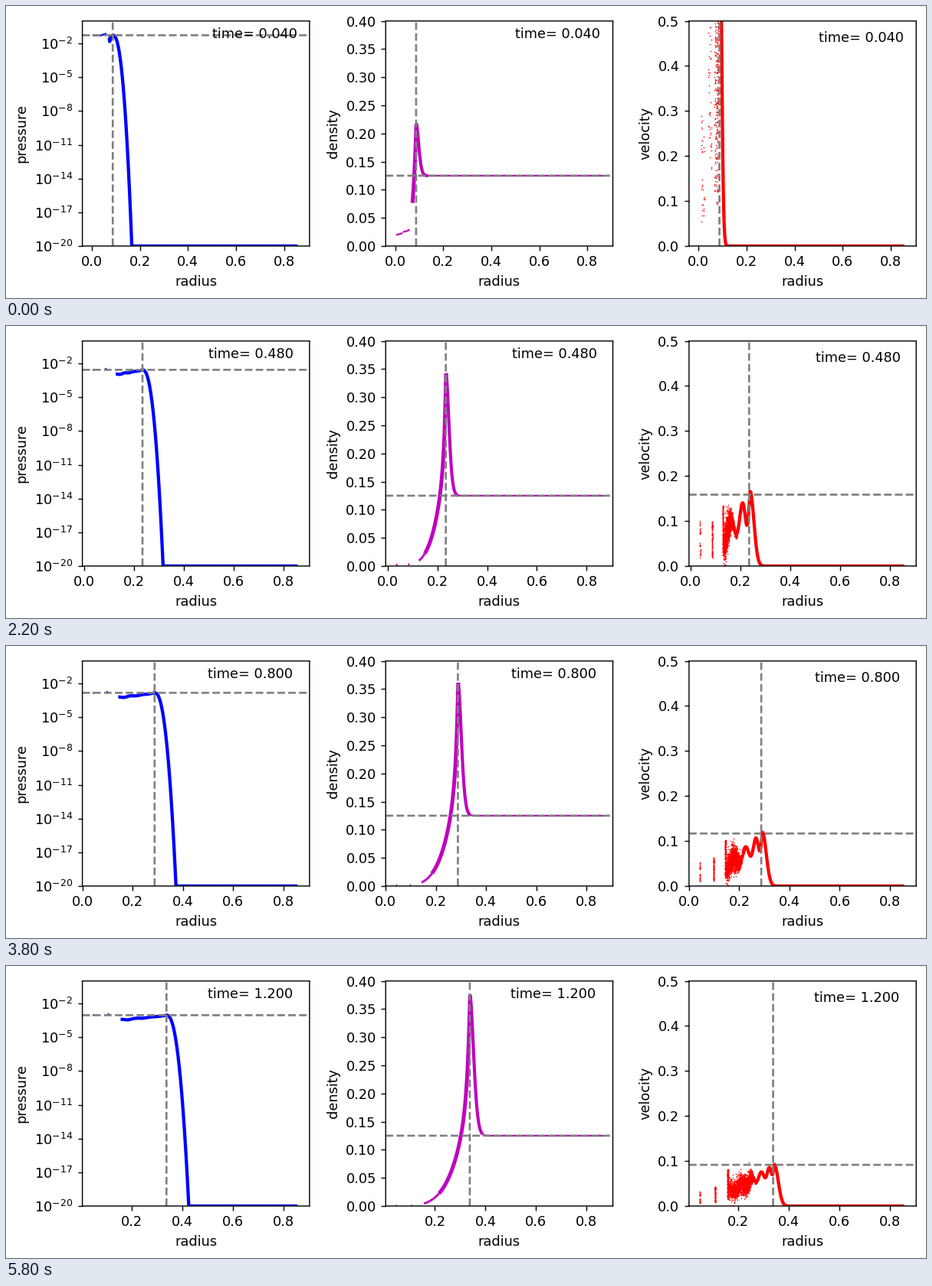
Write a matplotlib script that moves like this. It is 1200 px wide and 382 px high and loops after 6 s.

```python
import numpy as np
import matplotlib.pyplot as plt
from matplotlib.animation import FuncAnimation

W, H, DPI = 1200, 382, 128
FRAMES, STEP_MS = 30, 200
DT = 0.04
R_MAX, R_DATA = 0.8635, 0.857
RHO0 = 0.125

plt.rcParams["font.family"] = "DejaVu Sans"
plt.rcParams["path.snap"] = False

rng = np.random.default_rng(7)
CLOUD_U = rng.uniform(0, 1, 2400)
CLOUD_N = rng.normal(0, 1, 2400)
SHELL_U = [rng.uniform(-1, 1, (2, n)) for n in (32, 95, 160)]


class Blast:
    """Strong explosion at time t: the front and the zones behind it."""

    def __init__(self, t):
        self.t = t
        self.R = 0.3142 * t**0.4
        self.logp = -2.945 - 1.2 * np.log10(t)
        self.V = 0.1021 * t**-0.6
        self.r_min = 0.0436 + 0.0126 * np.log(t)
        self.inner = 0.15 * t**0.23
        self.peak = 0.537 - 0.168 * t**-0.2

        # Speed ripples: crest spacing, depth, and crests before the noise
        self.Rv = self.R + 0.005 * (1 - np.exp(-t / 0.3))
        self.top = self.V * (1 + 0.12 * np.exp(-t / 0.5))
        self.wave = 0.0388 - 0.0152 * t
        self.depth = 0.63 * np.exp(-0.85 * t)
        self.calm = max(0.1, 2.45 + 1.15 * np.log(t))

        # Isolated inner shells: radius, mean speed
        self.width = 0.002 * t**-0.6
        self.shells = (
            (self.r_min + self.width, min(0.17, 0.0235 * t**-1.25)),
            (0.103 * t**0.25, 0.03 * t**-0.9),
            (self.inner + 0.002, 0.053 * t**-0.55),
        )

    def pressure(self):
        q = np.linspace(0, 1, 100)
        wiggle = 0.05 + 0.4 * np.exp(-self.t / 0.05)
        dip = (1 - q) * wiggle * np.cos(6 * np.pi * q) - 0.42 * (1 - q) ** 0.8
        u = np.linspace(0, 1, 120)
        front = self.R + u * (0.079 + 0.0078 * self.t)
        r = np.r_[self.inner + q * (self.R - self.inner), front, R_DATA]
        y = np.r_[self.logp + dip, self.logp - (self.logp + 20) * u**2.35, -20]
        return r, 10.0**y

    def density(self, r):
        R = self.R + 0.001
        lam = np.minimum(r / R, 1)
        base = RHO0 / 0.9**5
        behind = base * lam**5 + (self.peak - base) * np.exp((lam - 1) / 0.03)
        scale = 0.0145 + 0.005 * self.t
        fall = np.exp(-(np.maximum(r - R, 0) / scale) ** 1.7)
        return np.where(r < R, behind, RHO0 + (self.peak - RHO0) * fall)

    def speed(self, r):
        n = (np.maximum(self.Rv - r, 0) / self.wave) ** (1 / 1.35)
        ripple = 1 - self.depth * (1 - np.cos(2 * np.pi * n)) / 2
        scale = 0.0215 - 0.014 * np.exp(-self.t / 0.12)
        fall = np.exp(-(np.maximum(r - self.Rv, 0) / scale) ** 2)
        return self.top * np.minimum(r / self.Rv, 1) ** 1.2 * ripple * fall, n


def make_axes(i, ylabel, ticks, ylim, scale="linear"):
    ax = fig.add_axes([(99.6 + 395.65 * i) / W, 68 / H, 296.3 / W, 294.4 / H])
    ax.set_yscale(scale)
    ax.set_xlabel("radius")
    ax.set_ylabel(ylabel)
    ax.set_xticks(np.arange(0, 0.9, 0.2))
    ax.set_yticks(ticks)
    ax.set_yticks([], minor=True)
    ax.set_ylim(*ylim)
    return ax


def curve(ax, color, width):
    return ax.plot([], [], color=color, lw=width, solid_capstyle="butt")[0]


def guide_lines(ax):
    style = dict(color="gray", ls="--", lw=1.5, zorder=2.2)
    return ax.axhline(RHO0, **style), ax.axvline(0.1, **style)


fig = plt.figure(figsize=(W / DPI, H / DPI), dpi=DPI, facecolor="white")
ax_p = make_axes(0, "pressure", 10.0 ** np.arange(-20, -1, 3), (1e-20, 1), "log")
ax_d = make_axes(1, "density", np.arange(0, 0.41, 0.05), (0, 0.4))
ax_v = make_axes(2, "velocity", np.arange(0, 0.51, 0.1), (0, 0.5))
axes = (ax_p, ax_d, ax_v)

p_main = curve(ax_p, "b", 2.4)
p_shells = [curve(ax_p, "b", 1.3) for _ in range(2)]
d_thin = curve(ax_d, "m", 1.6)
d_rise = curve(ax_d, "m", 2.8)
d_fall = curve(ax_d, "m", 2.3)
d_flat = curve(ax_d, "m", 1.3)
d_shells = [curve(ax_d, "m", 1.3) for _ in range(2)]
v_main = curve(ax_v, "r", 2.4)
v_dots = ax_v.plot([], [], "ro", ms=0.9, mew=0)[0]

guides = [guide_lines(ax) for ax in axes]
labels = [ax.text(0.5, y, "") for ax, y in zip(axes, (10**-1.5, 0.37, 0.454))]


def draw_pressure(b):
    p_main.set_data(*b.pressure())
    ends = np.array([-1, 1])
    for line, (r, _), tilt in zip(p_shells, b.shells, (0, 0.1)):
        line.set_data(r + b.width * ends, 10 ** (b.logp + tilt * (ends + 0.5)))


def draw_density(b):
    split = max(0.64 * b.R, b.inner)
    tail = b.R + 0.05
    spans = ((d_thin, b.inner, split), (d_rise, split, b.R + 0.001),
             (d_fall, b.R + 0.001, tail), (d_flat, tail, R_MAX))
    for line, start, end in spans:
        r = np.linspace(start, end, 120)
        line.set_data(r, b.density(r))
    for line, (r, _), level in zip(d_shells, b.shells, (0.0012, 0.0015)):
        rho = level * b.t**-0.89
        line.set_data([r - b.width, r, r + b.width], [rho * 0.95, rho, rho * 1.1])


def draw_velocity(b):
    edge = max(b.Rv - b.wave * b.calm**1.35, b.inner + 0.002)
    r = np.r_[np.linspace(edge, b.Rv + 0.07, 300), R_DATA]
    v_main.set_data(r, b.speed(r)[0])

    # Noisy particles between the inner hole and the calm ripples
    lo, hi = (b.inner + 0.004) ** 3, (edge + 0.006) ** 3
    count = int(min(CLOUD_U.size, 6e5 * (hi - lo)))
    r = np.cbrt(lo + CLOUD_U[:count] * (hi - lo))
    v, n = b.speed(r)
    noise = b.V * np.clip(0.2 * (n - b.calm), 0.02, 0.11 + 0.04 * b.depth)
    xs, ys = [r], [np.abs(v + noise * CLOUD_N[:count])]

    for (r, v), (jr, jv) in zip(b.shells, SHELL_U):
        xs.append(r + 0.5 * b.width * jr)
        ys.append(v * (1 + 0.7 * jv))
    v_dots.set_data(np.concatenate(xs), np.concatenate(ys))


def update(i):
    b = Blast(DT * (i + 1))
    draw_pressure(b)
    draw_density(b)
    draw_velocity(b)

    pad = 0.05 * (R_MAX - b.r_min)
    levels = (10**b.logp, RHO0, b.V)
    for ax, (hline, vline), label, level in zip(axes, guides, labels, levels):
        ax.set_xlim(b.r_min - pad, R_MAX + pad)
        hline.set_ydata([level, level])
        vline.set_xdata([b.R, b.R])
        label.set_text(f"time= {b.t:.3f}")
    return []


anim = FuncAnimation(fig, update, frames=FRAMES, interval=STEP_MS,
                     init_func=lambda: update(0), repeat=True, repeat_delay=0,
                     blit=False)
plt.show()
```
